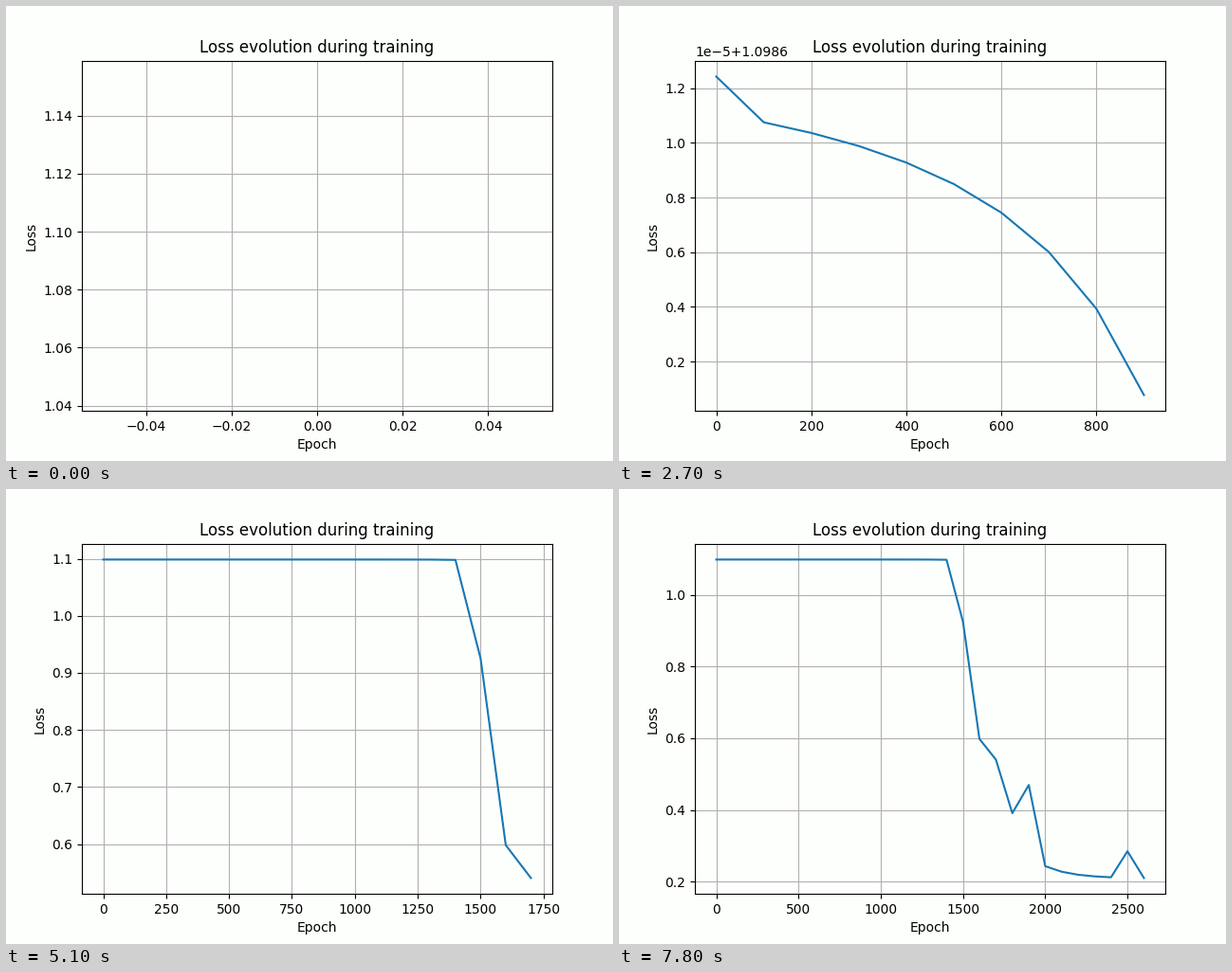
Recreate the animation shown at these times as a matplotlib script. Size 640x480 px, loop 8 s.

```python
import matplotlib.pyplot as plt
import numpy as np
from matplotlib.animation import FuncAnimation

LOOP_MS = 8000
INTERVAL_MS = 100
FRAMES_PER_POINT = 3
EPOCH_STEP = 100
LAST_EPOCH = 2600
ESCAPE_EPOCH = 1500
BACKGROUND = "#fdfffc"

# Epoch and height of the bumps on the way down.
SPIKES = {1700: 0.12, 1800: 0.067, 1900: 0.198, 2500: 0.074}


def plateau_loss(epoch):
    """Quick first dip, then a slow slide that steepens as a power law."""
    step = epoch / EPOCH_STEP
    first_dip = 1.365 * np.exp(-6 * step)
    slide = 247 * (14.562 - step) ** -1.73
    return 1.0986 + 1e-6 * (13.467 + first_dip - slide)


def descent_loss(epoch):
    """Exponential decay to a floor, with bumps."""
    step = (epoch - ESCAPE_EPOCH) / EPOCH_STEP
    return 0.209 + 0.716 * np.exp(-0.61 * step) + SPIKES.get(epoch, 0)


def loss(epoch):
    return plateau_loss(epoch) if epoch < ESCAPE_EPOCH else descent_loss(epoch)


epochs = range(0, LAST_EPOCH + 1, EPOCH_STEP)
losses = [loss(epoch) for epoch in epochs]

fig, ax = plt.subplots(figsize=(6.4, 4.8), dpi=100, facecolor=BACKGROUND)
ax.set_facecolor(BACKGROUND)
ax.set_title("Loss evolution during training")
ax.set_xlabel("Epoch")
ax.set_ylabel("Loss")
ax.grid(True)
(curve,) = ax.plot(epochs[:1], losses[:1], color="#1777b4")


def update(frame):
    count = min(frame // FRAMES_PER_POINT + 1, len(losses))
    curve.set_data(epochs[:count], losses[:count])
    ax.relim()
    ax.autoscale_view()
    return (curve,)


anim = FuncAnimation(fig, update, frames=LOOP_MS // INTERVAL_MS,
                     interval=INTERVAL_MS, repeat=True, repeat_delay=0)
plt.show()
```
